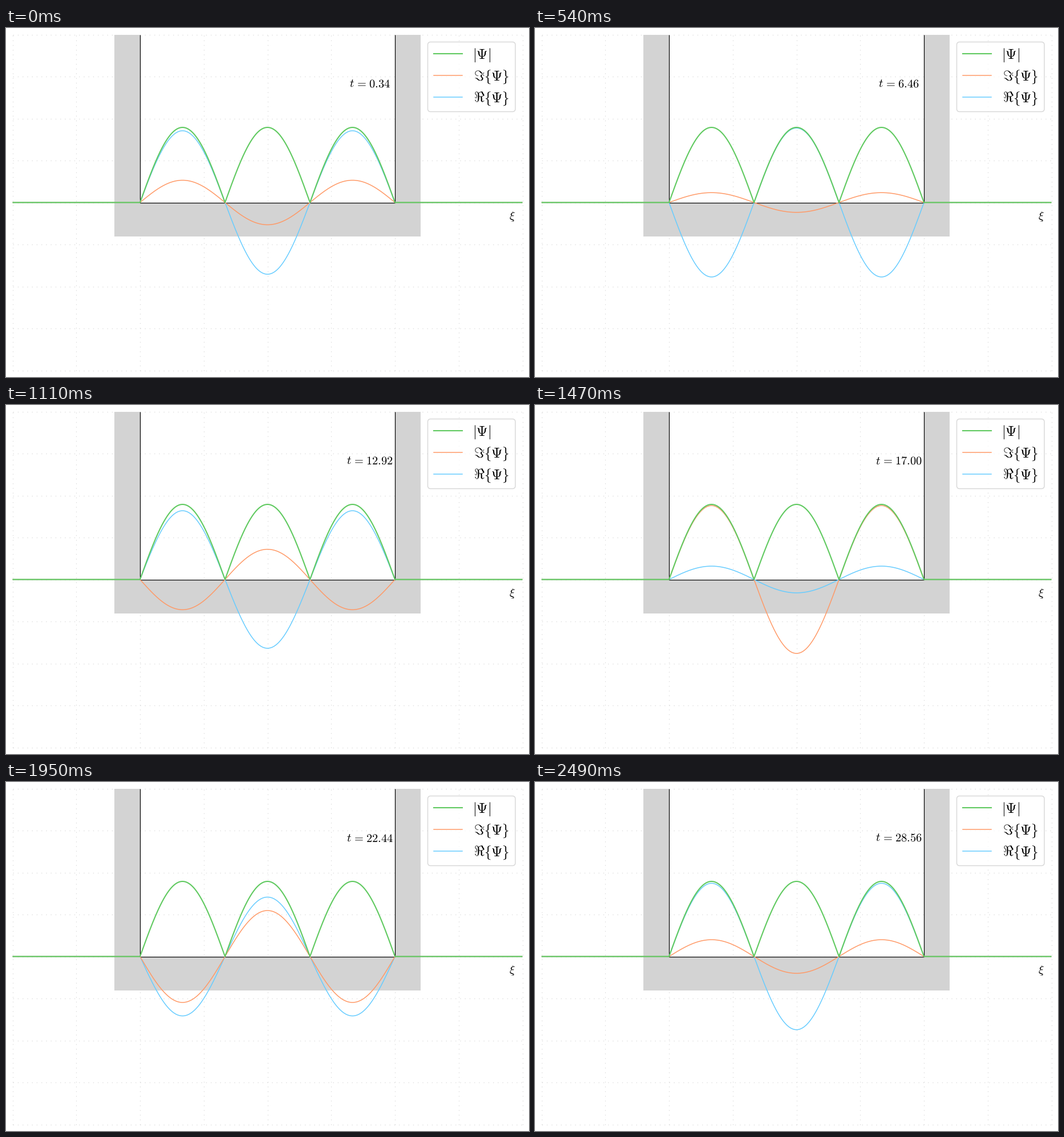
Animation of 917x611 px, one loop 2520 ms. Source, as a matplotlib script:

```python
import numpy as np
import matplotlib.pyplot as plt
from matplotlib.animation import FuncAnimation
from matplotlib.patches import FancyBboxPatch, Polygon

W, H = 917, 611
DPI = 72  # one point equals one pixel
FRAMES, INTERVAL = 84, 30
DT = 0.34
OMEGA = 0.44263

LEFT, RIGHT, TOP, BOTTOM = 11.5, 905.5, 11.5, 600.0
WELL_L, WELL_R, BASE = 235.0, 682.0, 305.5
AMP = 131.5

GREEN, ORANGE, BLUE = "#61ca61", "#ff9966", "#66ccff"

plt.rcParams["mathtext.fontset"] = "cm"
plt.rcParams["text.hinting"] = "no_hinting"

fig = plt.figure(figsize=(W / DPI, H / DPI), dpi=DPI, facecolor="white")
ax = fig.add_axes([0, 0, 1, 1])
ax.set_xlim(0, W)
ax.set_ylim(H, 0)
ax.axis("off")


def draw_grid():
    style = dict(color="#d9d9d9", lw=1.1, ls=(0, (1.3, 6.2)), zorder=0)
    for x in np.linspace(LEFT, RIGHT, 9):
        ax.plot([x, x], [BOTTOM, TOP], **style)
    for y in np.linspace(TOP, BOTTOM, 9):
        ax.plot([LEFT, RIGHT], [y, y], **style)


def draw_well():
    outer_l, outer_r, floor = 190.4, 727.4, 365
    inner = [(WELL_L, TOP), (WELL_L, BASE), (WELL_R, BASE), (WELL_R, TOP)]
    wall = inner + [(outer_r, TOP), (outer_r, floor),
                    (outer_l, floor), (outer_l, TOP)]
    ax.add_patch(Polygon(wall, fc="#d3d3d3", ec="none", zorder=1))
    ax.plot(*zip(*inner), color="black", lw=1.2, zorder=2,
            solid_capstyle="butt", solid_joinstyle="miter")


def draw_legend():
    ax.add_patch(FancyBboxPatch(
        (739.5, 24.5), 153.5, 122, boxstyle="round,pad=0,rounding_size=5",
        fc=(1, 1, 1, 0.8), ec=(0.8, 0.8, 0.8, 0.8), lw=1.39, zorder=6))
    rows = [(r"$|\Psi|$", GREEN, 2.1, 817.5),
            (r"$\Im\lbrace\Psi\rbrace$", ORANGE, 1.5, 819.5),
            (r"$\Re\lbrace\Psi\rbrace$", BLUE, 1.5, 819.5)]
    for i, (label, color, width, x) in enumerate(rows):
        y = 44.5 + 38.2 * i
        ax.plot([750, 800], [y, y], color=color, lw=width, zorder=7)
        ax.text(x, y + 8.75, label, size=25, va="baseline", zorder=7)


def curve(color, width, z):
    return ax.plot([], [], color=color, lw=width, zorder=z,
                   solid_capstyle="butt")[0]


draw_grid()
draw_well()
draw_legend()
ax.text(887.5, 331, r"$\xi$", size=20, ha="center", va="center")

x = np.linspace(LEFT, RIGHT, 1201)
inside = (x > WELL_L) & (x < WELL_R)
mode = np.where(inside,
                np.sin(3 * np.pi * (x - WELL_L) / (WELL_R - WELL_L)), 0)

real = curve(BLUE, 1.5, 3)
imag = curve(ORANGE, 1.5, 4)
modulus = curve(GREEN, 2.1, 5)
clock = ax.text(638, 104.8, "", size=20.4, ha="center", va="baseline")


def update(k):
    psi = AMP * mode * np.exp(1j * OMEGA * DT * (k + 2))
    real.set_data(x, BASE - psi.real)
    imag.set_data(x, BASE - psi.imag)
    modulus.set_data(x, BASE - np.abs(psi))
    clock.set_text(rf"$t\hspace{{0.116}}=\hspace{{0.116}}{DT * (k + 1):.2f}$")
    return real, imag, modulus, clock


anim = FuncAnimation(fig, update, frames=FRAMES, interval=INTERVAL,
                     repeat=True, repeat_delay=0)
plt.show()
```
